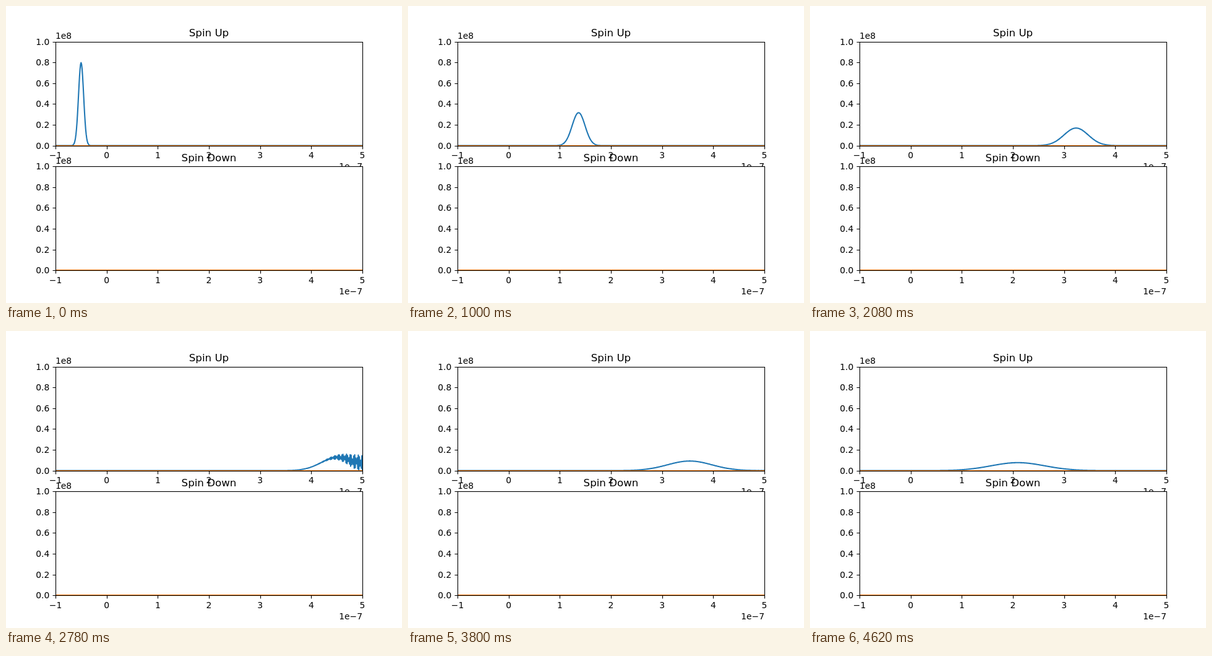
An HTML page that plays this animation: 640x480 px, repeating every 4640 ms.

```html
<!DOCTYPE html>
<html lang="en">
<head>
<meta charset="utf-8">
<title>Spin wave packet</title>
<style>
  html, body { margin: 0; width: 100%; height: 100%; overflow: hidden; background: #fff; }
  svg { display: block; width: 640px; height: 480px; }
  text { font-family: "DejaVu Sans", sans-serif; font-size: 13.889px; fill: #000; }
  .title { font-size: 16.667px; }
  .axis { fill: none; stroke: #000; stroke-width: 1.11; }
  .line { fill: none; stroke-width: 2.083; stroke-linejoin: round; }
</style>
</head>
<body>
<svg id="stage" viewBox="0 0 640 480" xmlns="http://www.w3.org/2000/svg"></svg>
<script>
const NS = "http://www.w3.org/2000/svg";
const stage = document.getElementById("stage");
const LEFT = 80, RIGHT = 576, HEIGHT = 168;
const BLUE = "#1f77b4", ORANGE = "#ff7f0e";

function add(parent, tag, attrs, text) {
  const el = document.createElementNS(NS, tag);
  for (const key in attrs) el.setAttribute(key, attrs[key]);
  if (text !== undefined) el.textContent = text;
  parent.appendChild(el);
  return el;
}

const snap = v => Math.floor(v + 0.5);

function label(x, y, anchor, text, cls = "") {
  add(stage, "text", { x, y, "text-anchor": anchor, class: cls }, text);
}

// One set of axes; returns the blue curve inside it.
function panel(id, top, title) {
  const bottom = top + HEIGHT;
  const t = snap(top), b = snap(bottom);
  const width = RIGHT - LEFT;
  const box = { x: LEFT, y: t, width, height: b - t };

  add(stage, "rect", { ...box, fill: "#fff" });
  add(add(stage, "clipPath", { id }), "rect", box);
  const plot = add(stage, "g", { "clip-path": `url(#${id})` });
  const curve = add(plot, "path", { class: "line", stroke: BLUE });
  add(plot, "path", { class: "line", stroke: ORANGE, d: `M${LEFT} ${b}H${RIGHT}` });

  let ticks = "";
  for (let i = 0; i <= 6; i++) {
    const x = LEFT + width * i / 6;
    ticks += `M${snap(x) + 0.5} ${b + 0.5}v5`;
    label(x, b + (id === "up" ? 20 : 21), "middle", String(i - 1).replace("-", "\u2212"));
  }
  for (let i = 0; i <= 5; i++) {
    const y = snap(bottom - HEIGHT * i / 5);
    ticks += `M${LEFT + 0.5} ${y + 0.5}h-5`;
    label(70.3, y + 5, "end", (i / 5).toFixed(1));
  }
  add(stage, "path", { class: "axis", d: ticks });
  add(stage, "rect", { ...box, x: LEFT + 0.5, y: t + 0.5, class: "axis" });

  label(LEFT, snap(top - 4.17), "start", "1e8");
  label(RIGHT, snap(bottom + 38.8), "end", "1e\u22127");
  label((LEFT + RIGHT) / 2, snap(top - 8.33), "middle", title, "title");
  return curve;
}

const upper = panel("up", 57.6, "Spin Up");
panel("down", 259.2, "Spin Down");

// Free Gaussian packet reflected by a hard wall; lengths in nm.
const WALL = 500, START = -50, SPEED = 8.488, SIGMA = 5, TAU = 9.51, K = 1.62;

function curvePath(step) {
  const T = step / TAU;
  const center = START + SPEED * step;
  const sigma = SIGMA * Math.sqrt(1 + T * T);
  const chirp = T / (4 * sigma * sigma);
  const wave = 2 * (K + 2 * chirp * (WALL - center));
  const peak = 1 / (sigma * Math.sqrt(2 * Math.PI));
  const density = x => peak * Math.exp(-0.5 * ((x - center) / sigma) ** 2);

  let d = "";
  for (let x = -100; x <= WALL; x++) {
    const a = density(x), b = density(2 * WALL - x);
    const rho = a + b - 2 * Math.sqrt(a * b) * Math.cos(wave * (x - WALL));
    const px = LEFT + (x + 100) * (RIGHT - LEFT) / 600;
    const py = 225.6 - rho * HEIGHT * 10;
    d += (d ? "L" : "M") + px.toFixed(2) + " " + py.toFixed(2);
  }
  return d;
}

// Steps come in threes: two short holds, then a long one.
function stepAt(ms) {
  const u = ms % 4640 + 20;
  return 3 * Math.floor(u / 140) + Math.min(2, Math.floor(u % 140 / 20)) - 1;
}

let shown = -1;
function draw(now) {
  const step = stepAt(now);
  if (step !== shown) {
    shown = step;
    upper.setAttribute("d", curvePath(step));
  }
}

function tick() {
  draw(performance.now());
  requestAnimationFrame(tick);
}
tick();
</script>
</body>
</html>
```
